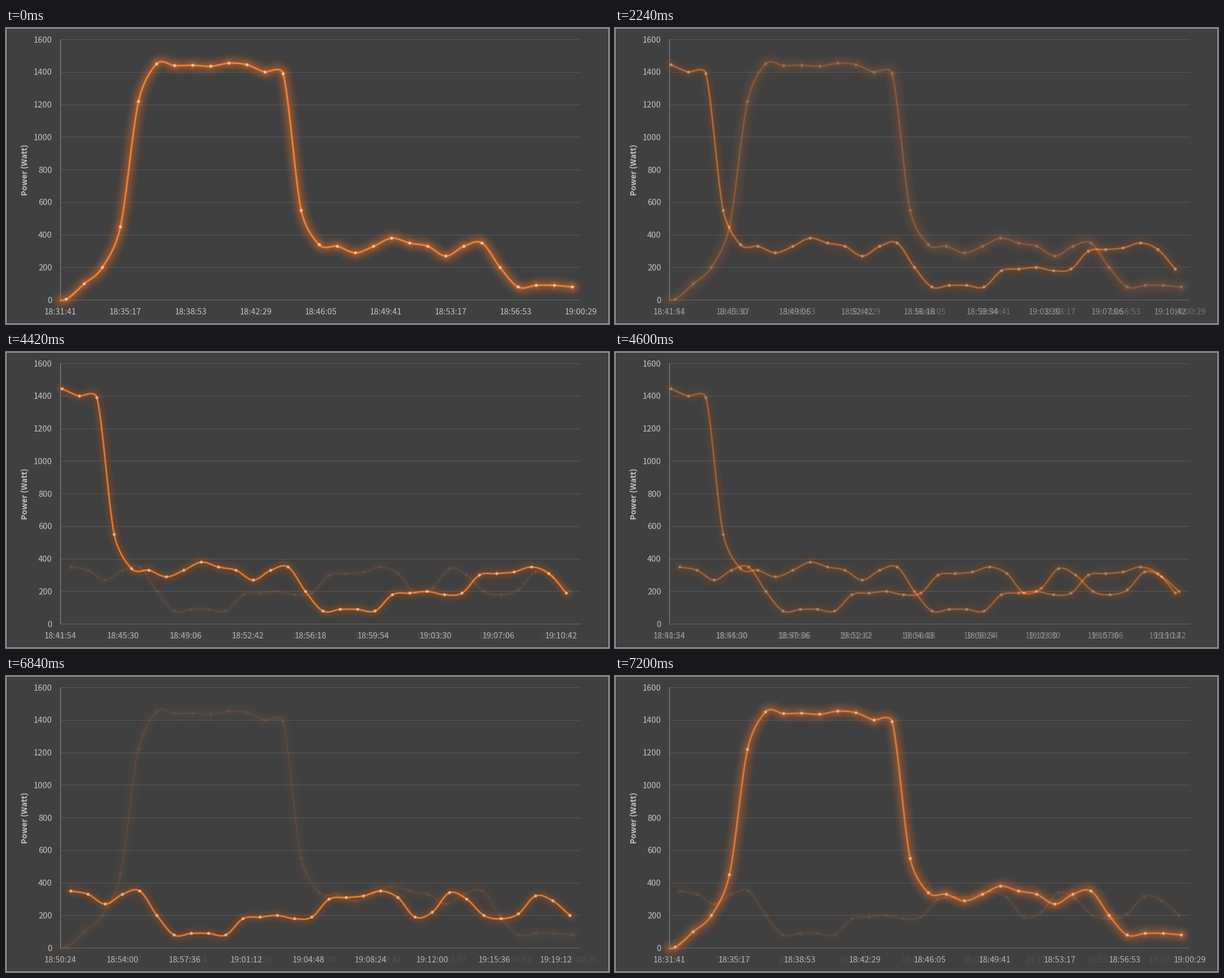
Animation, 1067 px wide and 525 px high, one loop 7260 ms. Source, as a matplotlib script:

```python
import numpy as np
import matplotlib.pyplot as plt
from matplotlib.animation import FuncAnimation

W, H, DPI = 1067, 525, 100
TICK, LOOP, SLIDE, HOLD, STEP, STEPS = 20, 7260, 2420, 2000, 60, 8
LEFT, RIGHT, BASE, TOP = 96, 1017, 482.5, 20.5

BACK, BORDER, GRID, AXIS = (64, 64, 64), (178, 178, 178), (88, 88, 88), (146, 146, 146)
LINE, DOT, INK = (240, 127, 48), (250, 192, 152), "#c4c4c4"

POWER = [5, 100, 200, 450, 1220, 1450, 1440, 1442, 1436, 1455, 1445, 1400, 1390,
         550, 340, 330, 290, 330, 380, 350, 330, 270, 330, 350, 200, 80, 90, 90, 80,
         180, 190, 200, 180, 190, 300, 310, 320, 350, 310, 190,
         220, 340, 300, 200, 180, 210, 320, 290, 200]

# first sample, last sample, x of first, x of last, start second, label spacing, glow
SLIDES = [
    dict(span=(0, 29), x=(106.5, 1002.3), start=66701, gap=115.1, lead=True,
         glow=(19, 0.58, (205, 103, 42)), halo=(12, 0.50)),
    dict(span=(10, 40), x=(99.3, 991.5), start=67314, gap=110.7, lead=False,
         glow=(15, 0.50, (168, 80, 18)), halo=(10, 0.28)),
    dict(span=(19, 49), x=(114.8, 998.0), start=67824, gap=109.65, lead=False,
         glow=(15, 0.50, (168, 80, 18)), halo=(10, 0.32)),
]


def level(value):
    return BASE - value * (BASE - TOP) / 1600


def smooth(pts):
    """Bezier spline with handles limited to half of each segment."""
    out = []
    last = len(pts) - 1
    for i in range(last):
        p0, p1, p2, p3 = (pts[min(max(i + k, 0), last)] for k in (-1, 0, 1, 2))
        d12 = np.hypot(*(p2 - p1))
        d02, d13 = np.hypot(*(p2 - p0)), np.hypot(*(p3 - p1))
        limit = d12 / 2 / max(d02, d13)
        a = min(1 / 3 if i == 0 else 1 / 6, limit)
        b = min(1 / 3 if i == last - 1 else 1 / 6, limit)
        c1, c2 = p1 + a * (p2 - p0), p2 - b * (p3 - p1)
        t = np.linspace(0, 1, int(4 * d12) + 2)[:, None]
        s = 1 - t
        out.append(s**3 * p1 + 3 * s * s * t * c1 + 3 * s * t * t * c2 + t**3 * p2)
    return np.concatenate(out)


def distance(pts, reach=20):
    """Distance of every pixel to the nearest point, up to reach."""
    field = np.full((H, W), 99.0)
    for x, y in pts:
        x0, x1 = max(int(x) - reach, 0), min(int(x) + reach + 1, W)
        y0, y1 = max(int(y) - reach, 0), min(int(y) + reach + 1, H)
        dx = np.arange(x0, x1) + 0.5 - x
        dy = np.arange(y0, y1) + 0.5 - y
        box = field[y0:y1, x0:x1]
        np.minimum(box, np.hypot(dx[None, :], dy[:, None]), out=box)
    return field


def paint(img, color, alpha):
    img += (np.array(color) - img) * alpha[..., None]


def disc(field, radius):
    return np.clip(radius + 0.5 - field, 0, 1)


def falloff(field, radius, strength):
    return strength * np.clip(1 - field / radius, 0, 1) ** 1.4


def backdrop():
    img = np.empty((H, W, 3))
    img[:] = BORDER
    img[1:-1, 1:-1] = BACK
    for value in range(0, 1601, 200):
        img[int(level(value)), LEFT:RIGHT] = GRID
    img[int(BASE), LEFT:RIGHT] = (104, 104, 104)
    img[int(TOP):int(BASE) + 1, LEFT] = AXIS
    return img


def chart(span, x, lead, glow, halo, **_):
    values = np.array(POWER[slice(*span)], float)
    dots = np.column_stack([np.linspace(*x, len(values)), level(values)])
    knots = dots
    if lead:
        knots = np.vstack([[2 * dots[0, 0] - dots[1, 0], BASE], dots])
    curve = smooth(knots)
    curve = curve[curve[:, 0] >= LEFT + 0.5]
    near, spots = distance(curve), distance(dots)

    img = backdrop()
    radius, strength, color = glow
    paint(img, color, falloff(near, radius, strength))
    paint(img, color, falloff(spots, *halo))
    if lead:
        chord = np.linspace(dots[0], dots[1], 160)
        paint(img, (236, 208, 188), 0.7 * disc(distance(chord), 0.5))
    paint(img, LINE, disc(near, 1.5))
    paint(img, DOT, disc(spots, 2.6))
    return img


def clock(s):
    return f"{s // 3600}:{s // 60 % 60:02d}:{s % 60:02d}"


plt.rcParams["font.family"] = ["Noto Sans CJK JP", "Liberation Sans"]
fig = plt.figure(figsize=(W / DPI, H / DPI), dpi=DPI, facecolor="#404040")


def label(x, y, text, px=14.65, **kw):
    return fig.text(x / W, 1 - y / H, text, fontsize=px * 72 / DPI, color=INK, **kw)


charts = [chart(**s) for s in SLIDES]
stage = fig.figimage(charts[0].astype(np.uint8), origin="upper")

for value in range(0, 1601, 200):
    label(81.7, level(value) + 5.2, str(value), ha="right", va="baseline")
label(34, 251.5, "Power (Watt)", 14, weight="bold", rotation=90, ha="center", va="center")

times = [[label(LEFT + 0.5 + k * s["gap"], 508.4, clock(s["start"] + 216 * k),
                ha="center", va="baseline") for k in range(9)] for s in SLIDES]


def update(i):
    n, p = divmod(i * TICK, SLIDE)
    mix = 0 if p < HOLD else (1 + (p - HOLD) // STEP) / STEPS
    after = (n + 1) % len(SLIDES)
    img = charts[n]
    if mix:
        img = img + (charts[after] - img) * mix
    stage.set_data((img + 0.5).astype(np.uint8))
    weights = {n: 1 - mix, after: mix}
    for k, row in enumerate(times):
        alpha = weights.get(k, 0)
        for text in row:
            text.set_visible(alpha > 0)
            text.set_alpha(alpha)
    return [stage]


anim = FuncAnimation(fig, update, frames=LOOP // TICK, interval=TICK,
                     repeat=True, repeat_delay=0, blit=False)
plt.show()
```
